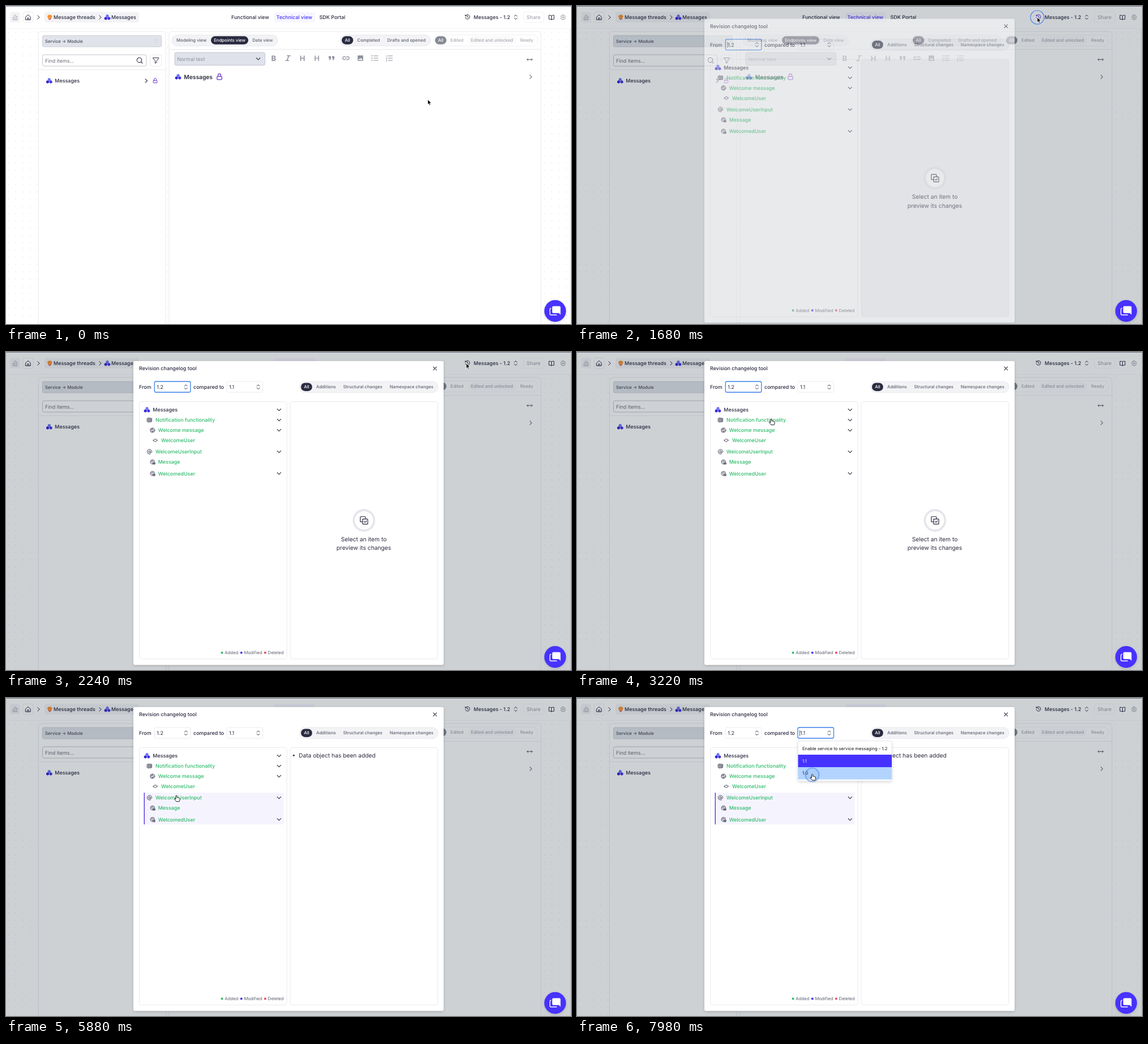
These frames come from a looping animation (998x561 px, 8 s). An HTML page:

```html
<!DOCTYPE html>
<html lang="en">
<head>
<meta charset="utf-8">
<title>Revision changelog</title>
<style>
html, body { margin: 0; width: 100%; height: 100%; overflow: hidden; background: #fff; }
svg { display: block; width: 998px; height: 561px; font-family: Inter, sans-serif; text-rendering: geometricPrecision; }
</style>
</head>
<body>
<svg id="stage" viewBox="0 0 998 561"></svg>
<script>
const INK = '#2a2b40', GREY = '#5d6270', PALE = '#a6a9b2', LINE = '#e4e5ea', PILL = '#f3f3f6',
      BLUE = '#4632ff', GREEN = '#2dbb6a', VIOLET = '#6b32cf';
const S = 7.68, M = 8.95, L = 10.24;

// Drawing helpers; text is placed by the middle of its capitals.
const text = (x, y, s, size = M, fill = INK, weight = 500, anchor = 'start') =>
  `<text x="${x}" y="${y + size * .364}" font-size="${size}" fill="${fill}" font-weight="${weight}" text-anchor="${anchor}">${s}</text>`;
const rect = (x, y, x2, y2, r, fill, stroke = 'none', more = '') =>
  `<rect x="${x}" y="${y}" width="${x2 - x}" height="${y2 - y}" rx="${r}" fill="${fill}" stroke="${stroke}" stroke-width=".8" ${more}/>`;
const icon = (x, y, d, color = INK, w = 1, fill = 'none') =>
  `<path transform="translate(${x} ${y})" d="${d}" fill="${fill}" stroke="${color}" stroke-width="${w}" stroke-linecap="round" stroke-linejoin="round"/>`;
const dot = (x, y, r, fill, more = '') => `<circle cx="${x}" cy="${y}" r="${r}" fill="${fill}" ${more}/>`;
const group = (id, body, more = '') => `<g id="${id}" ${more}>${body}</g>`;

const RIGHT = 'M-1.7-3.2 1.7 0-1.7 3.2', DOWN = 'M-3.2-1.6 0 1.6 3.2-1.6',
      UPDOWN = 'M-2.4-1.5 0-3.9 2.4-1.5M-2.4 1.5 0 3.9 2.4 1.5',
      CLOCK = 'M-3.4-2A4 4 0 1 1-3.8 1M-3.8-3.6V-1.6H-1.8M0-2.3V.2L1.7 1',
      LOCK = 'M-3.2-.7H3.2Q4.2-.7 4.2.3V3.8Q4.2 4.8 3.2 4.8H-3.2Q-4.2 4.8-4.2 3.8V.3Q-4.2-.7-3.2-.7ZM-2.5-.7V-2.8A2.5 2.5 0 0 1 2.5-2.8V-.7',
      GRID = 'M-3.8-3H3.8V3H-3.8ZM-1.2-4V4M1.6-3V3M-3.8 0H3.8',
      CYCLE = 'M4 0A4 4 0 1 1-4 0A4 4 0 1 1 4 0M-2 0V-1.6H1M2 0V1.6H-1M0-2.7 1-1.6M0 2.7-1 1.6',
      DIAMOND = 'M-3.8 0 0-2.4 3.8 0 0 2.4Z',
      AT = 'M1.7 0A1.7 1.7 0 1 1-1.7 0A1.7 1.7 0 1 1 1.7 0V.7Q2 1.8 3.2 1.4Q4.2.8 4.1-.4A4.1 4.1 0 1 0 2 3.5',
      FIELD = 'M3.5-.3A3.7 3.7 0 1 0-.5 3.6M1.2-.9A1.6 1.6 0 1 0-.8 1.2M1 .9H4V4H1ZM1 2.5H4';
const HEX = 'm0-2.9 2.5 1.4v2.8L0 2.7l-2.5-1.4v-2.8z';
const cubes = (x, y) => [[0, -2.3, '#6a74f4'], [-2.8, 2, '#3527d8'], [2.8, 2, '#4335e6']]
  .map(([dx, dy, c]) => icon(x + dx, y + dy, HEX, 'none', 0, c)).join('');

const tab = (x, y, s, color = GREY) => text(x, y, s, S, color);
const active = (x, x2, y, s, fill = INK) =>
  rect(x, y - 7.2, x2, y + 7.2, 7.2, fill) + text((x + x2) / 2, y, s, S, '#fff', 500, 'middle');

function header() {
  return rect(0, 0, 998, 39.5, 0, '#fff') + rect(0, 39.2, 998, 39.9, 0, '#eeeff2') + rect(0, 0, 998, 1, 0, '#8793a3')
    + rect(7, 10.5, 25, 29, 3, PILL) + icon(16, 20, 'M-4 4V0H-1.5V4ZM-1.5 4V-4H1.5V4ZM1.5 4V-1.5H4V4Z', PALE, .8)
    + rect(30, 10.5, 48, 29, 3, '#fff', LINE) + icon(39, 20, 'M-4.3-.7 0-4.5 4.3-.7V4.3H-4.3ZM-1.3 4.3V1H1.3V4.3')
    + icon(57.5, 20, RIGHT) + rect(68, 10.5, 235, 29, 4, PILL)
    + icon(77.3, 19.3, 'M-4.6-.8-2.2-3.8H2.2L4.6-.8 2.2 2H-2.2Z', 'none', 0, '#f7932a')
    + icon(77.3, 21.5, 'M-3.4-1 0 .7 3.4-1 2 1.8 0 3-2 1.8Z', 'none', 0, '#e4562b')
    + text(84, 19.7, 'Message threads') + icon(166.5, 20, RIGHT) + cubes(179, 20) + text(186, 19.7, 'Messages')
    + text(398, 19.7, 'Functional view') + rect(473.5, 11, 546, 28.5, 3, '#f7f5ff')
    + text(477.5, 19.7, 'Technical view', M, BLUE) + text(553.5, 19.7, 'SDK Portal')
    + group('clockHover', rect(807.5, 11, 823.5, 28, 4, '#f0ecff', '#7050e8'))
    + icon(815, 19.2, CLOCK).replace('<path', '<path id="clock"')
    + text(826, 19.7, 'Messages - 1.2') + icon(900.3, 19.7, UPDOWN)
    + rect(914, 10.5, 950, 29, 3, '#fff', '#f0f0f3') + text(919.5, 19.7, 'Share', M, PALE)
    + icon(963.5, 20, 'M0-2.8Q-1.4-4-4.5-3.7V3.2Q-1.2 3 0 4.2Q1.2 3 4.5 3.2V-3.7Q1.4-4 0-2.8V4')
    + icon(984, 20, 'M1.4 0A1.4 1.4 0 1 1-1.4 0A1.4 1.4 0 1 1 1.4 0M-1-4.3H1L1.4-3 3-3.2 4-1.5 3.2 0 4 1.5 3 3.2 1.4 3 1 4.3H-1L-1.4 3-3 3.2-4 1.5-3.2 0-4-1.5-3-3.2-1.4-3Z', '#9599a3', .9);
}

function sidebar() {
  return rect(57.5, 45, 282, 570, 5, '#fff', LINE)
    + rect(64.5, 52, 274.5, 72, 2.5, '#e0e3ea', '#c3c7d0') + text(69, 62, 'Service → Module', S, '#4a4e5c')
    + icon(264.5, 62, 'M-2-1.3 0-3.3 2-1.3M-2 1.3 0 3.3 2 1.3', '#bfc3cc', .8)
    + rect(64.5, 86, 248, 106, 2.5, '#fff', '#b4b7bf') + text(69, 96.3, 'Find items...', M, '#686c77', 400)
    + icon(236, 96, 'M3.7-.6A4.2 4.2 0 1 1-4.7-.6A4.2 4.2 0 1 1 3.7-.6M2.5 2.6 5 5', INK, 1.1)
    + rect(254.5, 86, 275, 106, 3, '#fff', LINE) + icon(264.8, 96, 'M-5-4.6H5V-3.6L1.3.6V3.5L-1.3 5V.6L-5-3.6Z')
    + rect(58, 112, 282, 112.8, 0, LINE)
    + cubes(76.3, 132) + text(86.3, 132, 'Messages') + icon(247.8, 132, RIGHT, INK, 1.1)
    + `<g transform="translate(263.5 131.8) scale(.8)">${icon(0, 0, LOCK, VIOLET, 1.2)}</g>`;
}

function editor() {
  const tool = '#8d919b', glyph = (x, s, more = 600) => text(x, 92.3, s, 13, tool, more, 'middle');
  const list = x => icon(x, 92, 'M-2-4H5.6M-2 0H5.6M-2 4H5.6', tool, 1.2);
  return rect(288, 45, 945, 570, 5, '#fff', LINE) + rect(288, 76, 945, 76.8, 0, LINE)
    + rect(293, 51, 480, 70.5, 9.7, PILL, LINE) + tab(301, 60.5, 'Modeling view')
    + active(362, 428, 60.5, 'Endpoints view') + tab(435.3, 60.5, 'Data view')
    + rect(590, 51, 750, 70.5, 9.7, PILL, LINE) + active(593, 613.3, 60.5, 'All')
    + tab(620.5, 60.5, 'Completed') + tab(673.5, 60.5, 'Drafts and opened')
    + rect(755.5, 51, 939.5, 70.5, 9.7, '#fff', '#ededf1') + active(757.8, 778, 60.5, 'All', '#888b95')
    + tab(785, 60.5, 'Edited', PALE)
    + rect(816.5, 53.3, 900.5, 67.7, 7, '#fafafb') + tab(821, 60.5, 'Edited and unlocked', PALE) + tab(908.3, 60.5, 'Ready', PALE)
    + rect(298, 82, 457.5, 104.5, 2.5, '#dfe2ea', '#b9bdc8') + text(302.5, 93.5, 'Normal text', M, '#8c909b', 400)
    + icon(445.5, 93.3, DOWN, '#3c4152', 1.3)
    + glyph(472.7, 'B', 700)
    + icon(498, 92, 'M-1.2-4.3H4M-4 4.3H1.2M1.6-4.3-1.6 4.3', tool, 1.5) + glyph(523.7, 'H', 600) + glyph(549.2, 'H', 500)
    + icon(575, 92, 'M-5-3.5H-1V.5L-2.5 3.5H-4.3L-3 .5H-5ZM1-3.5H5V.5L3.5 3.5H1.7L3 .5H1Z', 'none', 0, tool)
    + icon(600.5, 92, 'M-1-2.7H-3A2.7 2.7 0 0 0-3 2.7H-1M1-2.7H3A2.7 2.7 0 0 1 3 2.7H1M-2.3 0H2.3', tool, 1.2)
    + icon(626, 92, 'M-4.8-4.8H4.8V4.8H-4.8ZM-3.8 3.2H3.8L1.3-.5-.7 2-2 .6Z', 'none', 0, tool).replace('<path', '<path fill-rule="evenodd"')
    + list(651.5) + [88, 92, 96].map(y => dot(646.3, y, 1, tool)).join('')
    + list(677) + [1, 2, 3].map(n => text(672, 84 + n * 4, n, 4.4, tool, 600, 'middle')).join('')
    + icon(925, 94.5, 'M-4.8 0H4.8M-2.8-2-4.8 0-2.8 2M2.8-2 4.8 0 2.8 2', '#4a4e5c', .9)
    + cubes(304, 125) + text(314.3, 125.2, 'Messages', L, INK, 600)
    + icon(377, 125, LOCK, VIOLET, 1.3) + icon(927, 125, RIGHT);
}

const ROWS = [
  [102, 249, 259.3, 'Messages', null, 1], [120, 253.5, 264, 'Notification functionality', GRID, 1],
  [138, 258.8, 268.7, 'Welcome message', CYCLE, 1], [155.7, 263.8, 274, 'WelcomeUser', DIAMOND, 0],
  [176, 253.5, 264, 'WelcomeUserInput', AT, 1], [194, 259, 268.7, 'Message', FIELD, 0],
  [214.3, 259, 268.7, 'WelcomedUser', FIELD, 1]];

function modal() {
  const select = (x, value, id) => rect(x, 52, x + 63.5, 71, 2.5, '#fff', LINE)
    + group(id, rect(x, 52, x + 63.5, 71, 2.5, 'none', '#3f83ee', 'style="stroke-width:1.3"'))
    + text(x + 4, 61.8, value, M, INK, 400) + icon(x + 55.5, 61.7, UPDOWN)
    + rect(x + 3.3, 57, x + 4, 67, 0, '#222', 'none', `id="${id}Caret"`);
  const selection = (id, y, y2) =>
    group(id, rect(244, y, 490.5, y2, 0, '#f5f4fe') + rect(243.6, y, 245, y2, 0, '#5234dc'));
  const preview = (id, s) => group(id, dot(508.3, 101.3, 1.5, INK) + text(517, 101.2, s, L, INK, 400));
  return rect(225, 16, 773, 552, 3, '#fff', 'none', 'filter="url(#soft)"')
    + text(235, 28.7, 'Revision changelog tool') + icon(757.7, 29, 'M-2.8-2.8 2.8 2.8M2.8-2.8-2.8 2.8', INK, 1.1)
    + text(235, 61.7, 'From') + select(262.3, '1.2', 'from') + text(331, 61.7, 'compared to') + select(390, '1.1', 'to')
    + rect(518.5, 52, 763, 71.5, 9.7, PILL, LINE) + active(521, 540.8, 61.7, 'All')
    + tab(548, 61.7, 'Additions') + tab(595.5, 61.7, 'Structural changes') + tab(677.8, 61.7, 'Namespace changes')
    + rect(235.5, 87.5, 496, 541.5, 4, '#fff', LINE)
    + rect(502, 87.5, 762.7, 541.5, 4, '#fff', LINE, 'id="panel"')
    + selection('pickFirst', 111, 164.5) + selection('pickSecond', 167, 223)
    + ROWS.map(([y, ix, x, s, d, open]) => (d ? icon(ix, y, d, INK, .9) : cubes(ix, y))
        + text(x, y, s, M, d ? GREEN : INK) + (open ? icon(482.3, y, DOWN, INK, 1.1) : '')).join('')
    + [[381.5, 'Added', GREEN], [415.7, 'Modified', BLUE], [457.8, 'Deleted', '#ee4560']]
        .map(([x, s, c]) => dot(x, 530.5, 2, c) + text(x + 4.8, 530.5, s, S, GREY, 400)).join('')
    + group('empty', dot(632.3, 297, 18, '#fff', 'stroke="#e5e6eb" stroke-width="3.8"')
        + icon(632.3, 297, 'M-2.3-2.3H5.7Q6.7-2.3 6.7-1.3V5.7Q6.7 6.7 5.7 6.7H-1.3Q-2.3 6.7-2.3 5.7ZM-2.3 2.7H-5.5Q-6.5 2.7-6.5 1.7V-5.5Q-6.5-6.5-5.5-6.5H1.7Q2.7-6.5 2.7-5.5V-2.3M.2 2.2 1.7 3.7 4.4.8', INK, 1.2)
        + text(632, 330, 'Select an item to', L, INK, 400, 'middle') + text(632, 345.3, 'preview its changes', L, INK, 400, 'middle'))
    + preview('useCase', 'Use case has been added') + preview('dataObject', 'Data object has been added')
    + group('menu', rect(390.5, 76, 556, 146.3, 2.5, '#fff', LINE, 'filter="url(#soft)"')
        + rect(390.5, 78.5, 556, 100, 0, '#f4f3ff', 'none', 'id="optA"') + rect(390.5, 100, 556, 122, 0, BLUE)
        + rect(390.5, 122, 556, 143.7, 0, '#f4f3ff', 'none', 'id="optC"')
        + text(398, 89.3, 'Enable service to service messaging - 1.2', S, '#111', 400)
        + text(398, 111, '1.1', S, '#fff', 400) + text(398, 132.5, '1.0', S, '#111', 400));
}

stage.innerHTML = `<defs>
  <pattern id="dots" x="-2.4" y="40" width="12.8" height="12.8" patternUnits="userSpaceOnUse">${dot(6.4, 6.4, .65, '#d6d7de')}</pattern>
  <filter id="soft" x="-20%" y="-20%" width="140%" height="140%"><feDropShadow dx="0" dy="1.5" stdDeviation="2.5" flood-opacity=".16"/></filter>
  </defs>`
  + rect(0, 0, 998, 561, 0, '#fff') + rect(0, 40, 998, 561, 0, 'url(#dots)') + rect(996, 40, 997, 561, 0, '#e6e7eb')
  + sidebar() + editor() + header()
  + group('tip', rect(790.5, 29.5, 839.7, 51, 3, '#25263a') + text(815, 40.3, 'Changelog', S, '#fff', 500, 'middle'))
  + rect(0, 0, 998, 561, 0, 'rgba(14,26,40,.2)', 'none', 'id="shade"')
  + group('dialog', modal())
  + dot(970, 538, 19.2, BLUE, 'filter="url(#soft)"')
  + icon(971.3, 536.3, 'M-4.5-6.7H6.2Q8.2-6.7 8.2-4.7V8.5L5.2 5.5H-4.5Q-6.5 5.5-6.5 3.5V-4.7Q-6.5-6.7-4.5-6.7Z', 'none', 0, '#fff')
  + icon(969, 539, 'M-6.5-5.8Q-8.3-5.5-8.3-3.5V3.8Q-8.3 6-6.2 6H3.5', '#fff', 1.4)
  + dot(0, 0, 12, 'none', 'id="ring"')
  + group('pointer',
      group('arrow', icon(0, 0, 'M0 0V9L2 7.2 3.3 10.2 4.9 9.5 3.6 6.6H6.3Z', '#fff', .8, '#000'))
    + group('hand', icon(0, -1, 'M-1.1 6.3V1Q-1 0 0 0T1.1 1V3.7Q2.3 3 3 4.1 4.2 3.5 4.7 4.6 6 4.2 6.1 5.4V7.6Q6 9 5.1 10.6H-.2Q-1.6 8.8-3.4 6.7-3.7 5.3-2.4 5.3Z', '#000', .9, '#fff')));

const el = id => document.getElementById(id);
const show = (id, on) => el(id).setAttribute('visibility', on ? 'visible' : 'hidden');
const set = (id, attrs) => Object.entries(attrs).forEach(([k, v]) => el(id).setAttribute(k, v));

// Pointer moves: start, end, target. Clicks: press, release.
const MOVES = [[420, 1260, 813, 20], [2310, 3150, 343, 119], [4200, 4690, 301, 173], [6020, 6650, 418.7, 57], [7210, 7630, 415.5, 135.5]];
const CLICKS = [[1540, 1680], [3500, 3640], [4900, 5040], [6720, 6860], [7840, 8000]];
const STEP = 70, LOOP = 8000;

function pointerAt(t) {
  let x = 745, y = 165;
  for (const [a, b, tx, ty] of MOVES) {
    const p = Math.min(1, Math.max(0, (t - a) / (b - a))), e = p * p * (3 - 2 * p);
    x += (tx - x) * e;
    y += (ty - y) * e;
  }
  return [x, y];
}

function drawRing(t, x, y) {
  const click = CLICKS.find(([press, release]) => t >= press && t < release + 350);
  show('ring', click);
  if (!click) return;
  const q = Math.max(0, (t - click[1]) / 350), held = t < click[1];
  set('ring', {
    cx: x, cy: y, r: 12 + 14 * (1 - (1 - q) ** 3), opacity: 1 - q, stroke: '#4d86ea',
    'stroke-width': held ? 2.2 : 1.2, 'stroke-opacity': held ? .55 : 1,
    fill: held ? 'rgba(90,140,235,.1)' : 'none'
  });
}

function draw(now) {
  const t = Math.floor(now % LOOP / STEP) * STEP;
  const [x, y] = pointerAt(t), open = t >= 1680, menu = t >= 6790;
  const blink = since => t >= since && Math.floor((t - since) / 500) % 2 === 0;

  const hover = t >= 1190 && !open;
  show('clockHover', hover);
  set('clock', { stroke: hover || (open && t < 1900) ? '#5b3fe0' : INK });
  show('tip', t >= 1330 && !open);

  const rest = Math.exp((1645 - t) / 85);
  show('shade', open);
  set('dialog', { display: open ? 'inline' : 'none', opacity: 1 - rest * rest, transform: `translate(0 ${rest < .02 ? 0 : 10 * rest})` });
  set('panel', { fill: t < 1820 ? '#f1f1f4' : t < 1890 ? '#f8f8fa' : '#fff' });

  const first = t >= 3640 && t < 5040, second = t >= 5040;
  show('from', open && t < 3570);
  show('fromCaret', t < 3570 && blink(1680));
  show('to', t >= 6860);
  show('toCaret', blink(6790));
  show('empty', !first && !second);
  show('pickFirst', first);
  show('useCase', first);
  show('pickSecond', second);
  show('dataObject', second);

  show('menu', menu);
  show('optA', menu && y < 100);
  show('optC', menu && y > 122);
  set('optC', { fill: t >= 7840 ? '#b2d4ff' : '#f4f3ff' });

  const hand = hover || (t >= 3220 && t < 6370) || (menu && y > 79);
  show('hand', hand);
  show('arrow', !hand);
  set('pointer', { transform: `translate(${x} ${y})` });
  drawRing(t, x, y);
}

const start = performance.now();
(function loop() {
  draw(performance.now() - start);
  requestAnimationFrame(loop);
})();
</script>
</body>
</html>
```
